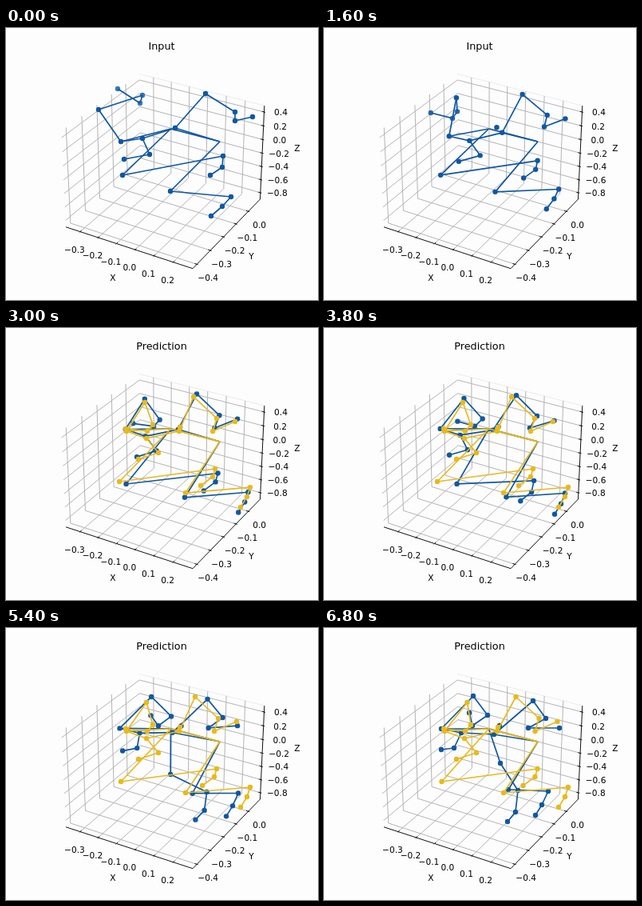
These frames come from a looping animation (391x340 px, 7000 ms). An HTML page with a canvas:

```html
<!DOCTYPE html>
<html lang="en">
<head>
<meta charset="utf-8">
<title>Pose forecast</title>
<style>
  html, body { margin: 0; width: 100%; height: 100%; overflow: hidden; background: #fdfdfd; }
  canvas { display: block; }
</style>
</head>
<body>
<canvas id="stage" width="391" height="340"></canvas>
<script>
const ctx = document.getElementById('stage').getContext('2d');
const LOOP = 7000, STEP = 200, PREDICT_AT = 2000, TURN = 2400, END = 6800;
const BLUE = '#1157a1', GOLD = '#e9b91c';

const mix = (a, b, s) => a + (b - a) * s;
const smooth = u => u * u * (3 - 2 * u);

// ---- Skeleton ----
// A joint eases through three points: start, turn and end. Its limb adds
//   bow:   how far the path curves out in each half
//   miss:  where the forecast settles, relative to the turn
//   drift: slow sideways slip of the forecast, px per second
const joints = {};
const still = { bow: [[0, 0], [0, 0]], miss: [0, 0], drift: 0, opacity: 1 };

function limb(motion, parts) {
  for (const [name, [parents, ...points]] of Object.entries(parts))
    joints[name] = { ...still, ...motion, parents, points };
}

function measured({ points, bow }, t) {
  if (points.length === 1) return points[0];
  const half = t < TURN ? 0 : 1;
  const u = half ? (t - TURN) / (END - TURN) : t / TURN;
  return [0, 1].map(c =>
    mix(points[half][c], points[half + 1][c], smooth(u)) + bow[half][c] * Math.sin(Math.PI * u));
}

// The forecast keeps the pose of the turn, off by the limb's error
function forecast(joint, t) {
  const [x, y] = measured(joint, Math.min(t, TURN));
  if (joint.points.length === 1) return [x, y];
  const settled = 1 - Math.exp((1800 - t) / 300);
  const slip = joint.drift * Math.max(0, t - 4600) / 1000;
  return [x + joint.miss[0] * settled + slip, y + joint.miss[1] * settled];
}

limb({}, {
  hipL: [[], [206.5, 126]],
  hipR: [['hipL'], [268, 142]],
  spine: [[], [212, 125], [218, 124], [220, 122]]
});
limb({ bow: [[7, 5], [-7, -1]], miss: [-2, 2] }, {
  shoulderL: [['hipL'], [144, 142], [153, 127], [147, 126]],
  shoulderR: [['hipR'], [212, 125], [219, 127], [213, 133]],
  neck: [['shoulderL', 'shoulderR'], [171, 138], [178, 136], [172, 131]],
  head: [['neck'], [180, 158], [193, 154], [163, 150]],
  crown: [['head'], [148, 164], [168, 162], [147, 152]]
});
limb({ bow: [[8, -6], [-2, 0]], miss: [0, 4], drift: 2.5 }, {
  elbowL: [['shoulderL'], [116, 102], [174, 89], [187, 85]]
});
limb({ bow: [[-20, -3], [7, 0]], miss: [-5, 6], opacity: 0.8 }, {
  wristL: [['elbowL'], [171, 84], [189, 115], [205, 109]],
  handL: [['wristL'], [168, 94], [182, 123], [186, 122]],
  tipL: [['handL'], [140, 76], [155, 120], [182, 106]]
});
limb({ bow: [[7, 1], [-5, 0]], miss: [-5, 4], drift: 2.5 }, {
  elbowR: [['shoulderR'], [250, 82], [240, 82], [262, 91]],
  wristR: [['elbowR'], [287, 105], [269, 109], [278, 113]],
  handR: [['wristR'], [287, 116], [264, 125], [256, 125]],
  tipR: [['handR'], [309, 111], [292, 113], [295, 125]]
});
limb({ bow: [[1, -7], [4, 10]], miss: [-3, 0], drift: 2.5 }, {
  kneeL: [['hipL'], [146, 184], [145, 192], [221, 169]],
  ankleL: [['kneeL'], [272, 160], [265, 176], [243, 203]],
  footL: [['ankleL'], [271, 174], [262, 186], [240, 230]],
  toeL: [['footL'], [256, 184], [247, 197], [230, 242]]
});
limb({ bow: [[-3, -5], [6, 3]], miss: [4, -5] }, {
  kneeR: [['hipR'], [206, 204], [221, 211], [231, 202]],
  ankleR: [['kneeR'], [282, 211], [302, 204], [281, 204]],
  footR: [['ankleR'], [271, 223], [298, 216], [273, 221]],
  toeR: [['footR'], [257, 235], [290, 229], [265, 234]]
});

// ---- Axes: perspective view of a 4:4:3 box, elevation 30, azimuth -60 ----
function project([x, y, z]) {
  const px = (x - 0.5) * 1.1905, py = (y - 0.5) * 1.1905, pz = (z - 0.5) * 0.8929;
  const k = 1530 / (10 - (0.433 * px - 0.75 * py + 0.5 * pz));
  return [199 + k * (0.866 * px + 0.5 * py), 173.2 - k * (-0.25 * px + 0.433 * py + 0.866 * pz)];
}

const axes = [
  { name: 'X', min: -0.38, max: 0.3, first: -0.3, count: 6, step: 0.1, shift: [-7, 22.5], label: [134, 312],
    at: (f, out) => [f, -out, 0], grid: f => [[f, 0, 0], [f, 1, 0], [f, 1, 1]] },
  { name: 'Y', min: -0.43, max: 0.1, first: -0.4, count: 5, step: 0.1, shift: [14, 17], label: [307.5, 285.5],
    at: (f, out) => [1 + out, f, 0], grid: f => [[1, f, 0], [0, f, 0], [0, f, 1]] },
  { name: 'Z', min: -0.9, max: 0.49, first: -0.8, count: 7, step: 0.2, shift: [21, 0.3], label: [365, 150.5],
    at: (f, out) => [1 + out, 1, f], grid: f => [[0, 0, f], [0, 1, f], [1, 1, f]] }
];
for (const a of axes)
  a.ticks = Array.from({ length: a.count }, (_, i) => {
    const value = a.first + i * a.step;
    return {
      f: (value - a.min) / (a.max - a.min),
      digits: (value < 0 && value > -0.01 ? 0 : value).toFixed(1).replace('-', '\u2212')
    };
  });

function line(pts, color, width) {
  ctx.strokeStyle = color;
  ctx.lineWidth = width;
  ctx.beginPath();
  pts.forEach(p => ctx.lineTo(...p));
  ctx.stroke();
}

function text(str, x, y, size) {
  ctx.font = `${size}px "DejaVu Sans", sans-serif`;
  ctx.fillStyle = '#000';
  ctx.textAlign = 'center';
  ctx.fillText(str, x, y + size * 0.365);
}

function drawAxes() {
  const line3d = (pts, color) => line(pts.map(project), color, 1);
  line3d([[0, 1, 1], [1, 1, 1]], '#ececec');
  for (const a of axes)
    for (const { f } of a.ticks) line3d(a.grid(f), '#b4b4b4');
  for (const a of axes) {
    line3d([a.at(0, 0), a.at(1, 0)], '#111');
    for (const { f, digits } of a.ticks) {
      const [x, y] = project(a.at(f, 0));
      line3d([a.at(f, -0.017), a.at(f, 0.009)], '#111');
      text(digits, x + a.shift[0], y + a.shift[1], 10.6);
    }
    text(a.name, ...a.label, 10.6);
  }
}

function drawPose(place, color, t) {
  const pos = {};
  for (const name in joints) pos[name] = place(joints[name], t);
  for (const name in joints)
    for (const parent of joints[name].parents) line([pos[parent], pos[name]], color, 1.7);
  ctx.fillStyle = color;
  for (const name in joints) {
    const { points, opacity } = joints[name];
    if (points.length === 1) continue;
    ctx.globalAlpha = mix(opacity, 1, Math.min(1, t / 4000));
    ctx.beginPath();
    ctx.arc(...pos[name], 3.2, 0, Math.PI * 2);
    ctx.fill();
  }
  ctx.globalAlpha = 1;
}

function frame() {
  const t = Math.floor(performance.now() % LOOP / STEP) * STEP;
  const predicting = t >= PREDICT_AT;
  ctx.fillStyle = '#fdfdfd';
  ctx.fillRect(0, 0, 391, 340);
  drawAxes();
  drawPose(measured, BLUE, t);
  if (predicting) drawPose(forecast, GOLD, t);
  text(predicting ? 'Prediction' : 'Input', 195, 22.8, 12.8);
  requestAnimationFrame(frame);
}
frame();
</script>
</body>
</html>
```
